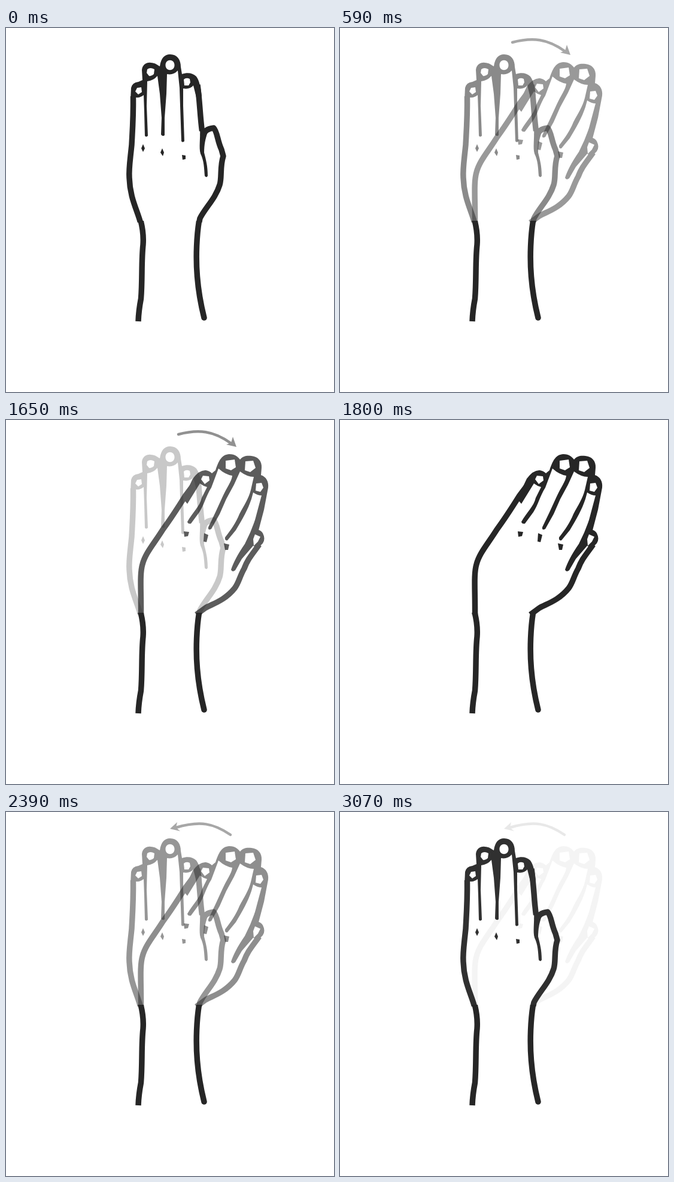
Animation of 548 by 608 pixels, one loop 3.1 s. Source, as an HTML page:

```html
<!DOCTYPE html>
<html lang="en">
<head>
<meta charset="utf-8">
<title>Wrist bend</title>
<style>
  html, body { margin: 0; width: 100%; height: 100%; overflow: hidden; background: #fff; }
  svg { display: block; width: 100%; height: 100%; }
  .ink { fill: #262626; }
  .line { fill: none; stroke: #262626; stroke-width: 9.5; stroke-linejoin: round; }
  #bent, #right, #left { opacity: 0; }
  .shaft { fill: none; stroke: #2b2b2b; stroke-width: 4.5; stroke-linecap: round; }
  .head { fill: #2b2b2b; }
</style>
</head>
<body>
<svg viewBox="0 0 548 608">
  <defs>
    <clipPath id="above"><path d="M0 0H548V325H0z"/></clipPath>
    <clipPath id="below"><path d="M0 322H548V608H0z"/></clipPath>
  </defs>

  <g id="straight" clip-path="url(#above)">
    <!-- fingertips, gaps between the fingers, nails cut out -->
    <path class="ink" fill-rule="evenodd" d="M208 120L209 100Q211 91 221 90L228 87L227 70C228 61 235 57 242 58
      C249 58 253 62 257 64C259 50 265 44 274 44C286 44 292 53 292 65L294 77C303 74 312 75 318 81C323 88 325 98 327 114
      L318 116L313 96Q307 103 296 101L296 130L298 189Q295 192 293 189L291 130L290 100L287 71Q280 79 269 77
      L268 110L265 150L265 179Q262 182 259 178L260 150L257 110L253 80Q246 88 236 89L235 130L237 180Q234 183 232 180
      L231 140L230 112Q224 117 217 116L216 122Z
      M219 100L226 99L227 107L221 111L216 106Z
      M236 69Q241 65 248 69L247 77Q243 81 239 80L235 75Z
      M266.500 62C266.500 51 281.500 51 281.500 62C281.500 73 266.500 73 266.500 62Z
      M297 86Q301 82 307 85L308 91L305 96L298 96Z"/>
    <path class="line" d="M212.500 114C213 150 211 175 210 195C207 225 205 235 206 250C207 285 220 305 225.500 328"/>
    <path class="line" d="M320 95C324 125 324 145 327.500 172"/>
    <path class="line" d="M329 180C331 171 338 168 347 167C353 173 353 188 360 203L363 214C357 232 361 250 357 262C350 285 333 300 324 318L322 328"/>
    <path class="ink" d="M324 168C325 185 322 200 325 210C331 222 331 235 332 247Q335 251 337 247C337 230 334 220 331 208C331 195 333 185 337 174Z"/>
    <path class="ink" d="M229 194L232 201L229 207L226 201ZM261 201L264 208L262 214L258 208ZM294 212L300 213L300 219L295 220Z"/>
  </g>

  <g id="bent" clip-path="url(#above)">
    <path class="ink" fill-rule="evenodd" d="M312 98Q323 83 334 84Q340 85 344 89L350 84C356 66 361 58 373 57C383 57 388 62 391 66
      C396 60 402 59 410 60C421 61 428 69 427 80L426 92C435 95 439 103 438 113L431 150L421 188L411 186L420 152L427 126
      Q420 126 413 121L410 132C404 150 396 164 384 184L370 201Q365 202 366 196C376 183 384 172 390 157
      C398 142 405 132 409 117L414 95Q403 95 391 86L381 108L368 132L357 157L343 182Q337 185 338 179
      L350 154L361 130C369 112 377 103 378 93Q366 91 355 81L343 113C334 127 331 142 323 154L309 173Q304 174 303 170
      C312 154 324 144 327 130L336 112Q329 110 324 106L303 140L296 132Z
      M329 93L339 94L340 101L332 107L326 99Z
      M367 68L382 66L384 79L376 84L367 81Z
      M400 69L413 68L417 80L408 87L399 84Z
      M418 106L427 105L430 113L425 120L417 118Z"/>
    <path class="line" d="M321 98L300 126C285 150 273 168 262 183C247 207 233 222 228 241C223 258 226 285 225.500 328"/>
    <path class="line" d="M423 208C411 225 404 232 398 248C390 262 389 272 382 281C365 302 345 307 333 314L318 325"/>
    <path class="ink" fill-rule="evenodd" d="M414 184Q424 181 429 189Q434 199 429 206L420 215L413 210L407 217L394 232L383 251Q378 255 376 250
      C380 238 386 226 399 207L408 188L417 165Z M416 191L425 195L421 203L414 210L413 199Z"/>
    <path class="ink" d="M297 186L306 187L304 194L298 195ZM331 189L338 192L335 204L330 203ZM364 206L373 208L371 217L366 217Z"/>
  </g>

  <g clip-path="url(#below)">
    <path class="line" d="M223.500 316C229 335 230 348 229 362C226 390 228 420 225.500 452C223 465 221.500 475 221 490"/>
    <path class="line" stroke-linecap="round" d="M324 314C318 345 317 385 319.500 415C321.500 440 325 460 331 484"/>
  </g>

  <g id="right">
    <path class="shaft" d="M288 24C322 15 347 18 376 39"/>
    <path class="head" d="M385 45L368 41L376 38L379 28Z"/>
  </g>
  <g id="left">
    <path class="shaft" d="M375 38C347 19 325 14 284 26"/>
    <path class="head" d="M274 28L286 17L284 26L291 32Z"/>
  </g>
</svg>
<script>
  const LOOP = 3100, FADE = 180, LEAD = 1;
  const starts = [500, 1650, 2300, 2950];

  // Opacity during each of the four rests.
  const levels = {
    straight: [1, 0.3, 0, 0.72],
    bent: [0, 0.7, 1, 0.28],
    right: [0, 0.62, 0, 0],
    left: [0, 0, 0, 0.62]
  };

  function keyframes(rests) {
    const frames = [{ offset: 0, opacity: rests[0] }];
    starts.forEach((start, i) => {
      const from = rests[i], to = rests[(i + 1) % 4];
      const last = i === 3;
      const count = last ? 5 : 6;
      frames.push({
        offset: (start - LEAD) / LOOP,
        opacity: from,
        easing: `steps(${count}, start)`
      });
      // The sixth step of the last fade is the start of the next loop.
      frames.push(last
        ? { offset: 1, opacity: from + (to - from) * 5 / 6 }
        : { offset: (start - LEAD + FADE) / LOOP, opacity: to });
    });
    return frames;
  }

  for (const [id, rests] of Object.entries(levels)) {
    document.getElementById(id).animate(keyframes(rests), { duration: LOOP, iterations: Infinity });
  }
</script>
</body>
</html>
```
